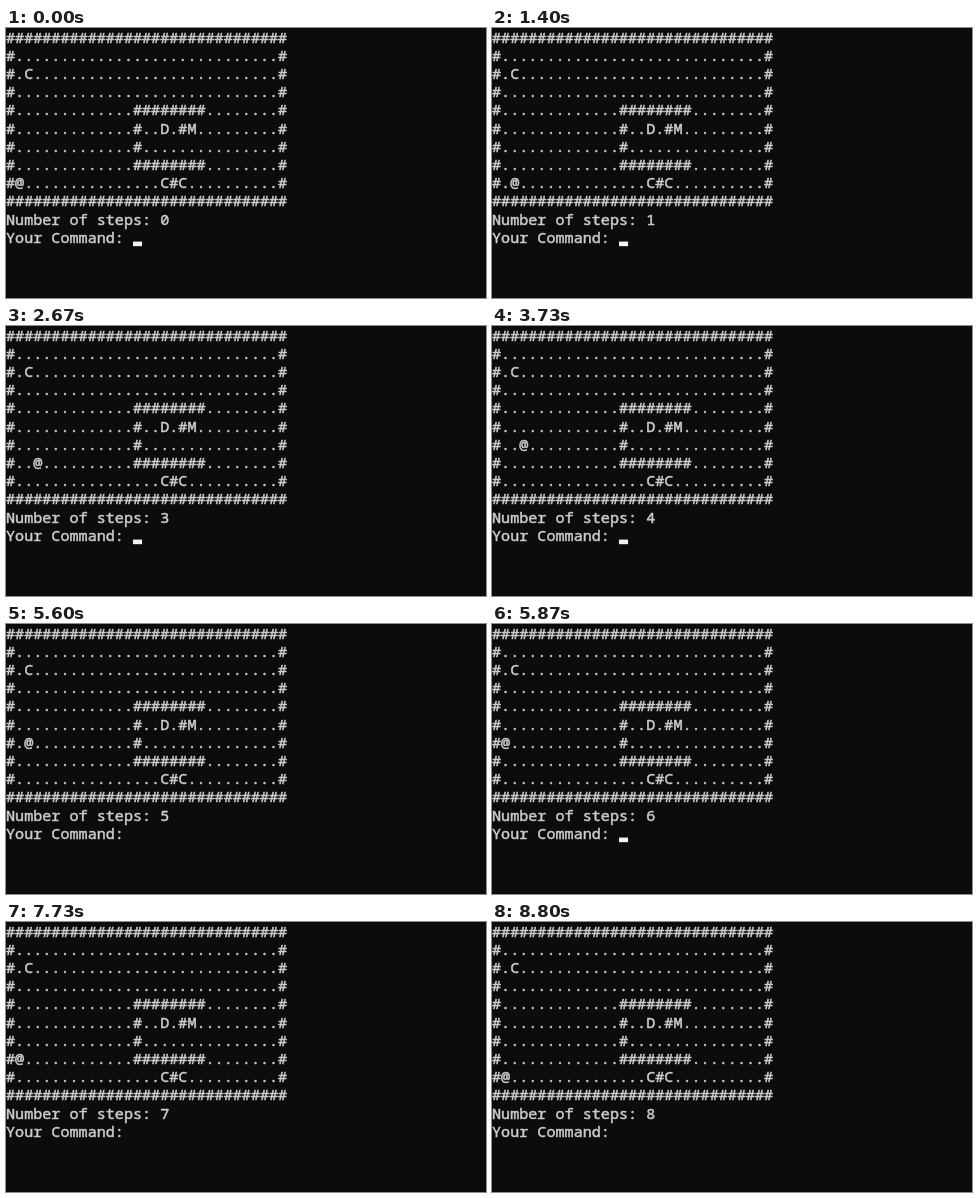
An HTML page that plays this animation: 480x270 px, repeating every 8.94 s.

```html
<!DOCTYPE html>
<html lang="en">
<head>
<meta charset="utf-8">
<title>Console maze</title>
<style>
  html, body { margin: 0; width: 100%; height: 100%; overflow: hidden; background: #0c0c0c; }
  svg { display: block; width: 480px; height: 270px; }
  text {
    font: 15.1px "Noto Sans Mono", "DejaVu Sans Mono", monospace;
    fill: #ccc; stroke: #ccc; stroke-width: 0.5px; stroke-linejoin: round; white-space: pre;
  }
  #cursor { fill: #f2f2f2; }
</style>
</head>
<body>
<svg viewBox="0 0 480 270">
  <g id="screen"></g>
  <rect id="cursor" width="9.1" height="4.6"/>
</svg>
<script>
const LOOP = 8940, CELL_W = 9.07, CELL_H = 18.17, BASELINE = 14.8;

const edge = '#'.repeat(31);
const dots = n => '.'.repeat(n);
const row = inner => '#' + inner.padEnd(29, '.') + '#';
const shelf = row(dots(13) + '#'.repeat(8));
const board = [
  edge, row(''), row('.C'), row(''), shelf,
  row(dots(13) + '#..D.#M'), row(dots(13) + '#'), shelf,
  row(dots(16) + 'C#C'), edge
];

// Player column and row after each step
const path = [[1, 8], [2, 8], [3, 8], [3, 7], [3, 6], [2, 6], [1, 6], [1, 7], [1, 8]];

const BLANK = -1;
const HIDDEN = null, PROMPT = [14, 11], BELOW = [0, 13];

// Start time, step shown, cursor cell
const timeline = [
  [0, 0, PROMPT],
  [130, BLANK, BELOW], [200, 1, PROMPT], [870, 1, HIDDEN], [1400, 1, PROMPT],
  [1530, BLANK, BELOW], [1600, 2, PROMPT], [2400, 2, HIDDEN],
  [2600, BLANK, HIDDEN], [2670, 3, PROMPT], [3470, 3, HIDDEN],
  [3670, BLANK, HIDDEN], [3730, 4, PROMPT], [4530, 4, HIDDEN],
  [4730, BLANK, HIDDEN], [4800, 5, PROMPT], [5600, 5, HIDDEN],
  [5800, BLANK, HIDDEN], [5870, 6, PROMPT], [6670, 6, HIDDEN],
  [6930, BLANK, HIDDEN], [7000, 7, PROMPT], [7730, 7, HIDDEN],
  [8070, BLANK, HIDDEN], [8130, 8, PROMPT], [8800, 8, HIDDEN]
];

const screen = document.getElementById('screen');
const cursor = document.getElementById('cursor');
const columns = Array.from({ length: 31 }, (_, i) => (i * CELL_W).toFixed(2)).join(' ');

const lines = Array.from({ length: 12 }, (_, r) => {
  const line = document.createElementNS('http://www.w3.org/2000/svg', 'text');
  line.setAttribute('x', columns);
  line.setAttribute('y', BASELINE + r * CELL_H);
  return screen.appendChild(line);
});

function screenText(step) {
  if (step === BLANK) return [];
  const [px, py] = path[step];
  const rows = board.map((s, y) => y === py ? s.slice(0, px) + '@' + s.slice(px + 1) : s);
  return [...rows, 'Number of steps: ' + step, 'Your Command: '];
}

function show([, step, cell]) {
  const rows = screenText(step);
  lines.forEach((line, i) => { line.textContent = rows[i] || ''; });
  cursor.style.display = cell ? '' : 'none';
  if (cell) {
    cursor.setAttribute('x', cell[0] * CELL_W);
    cursor.setAttribute('y', cell[1] * CELL_H + 13.7);
  }
}

let current;
function tick() {
  const t = performance.now() % LOOP;
  const state = timeline.findLast(([start]) => start <= t);
  if (state !== current) show(current = state);
  requestAnimationFrame(tick);
}
tick();
</script>
</body>
</html>
```
